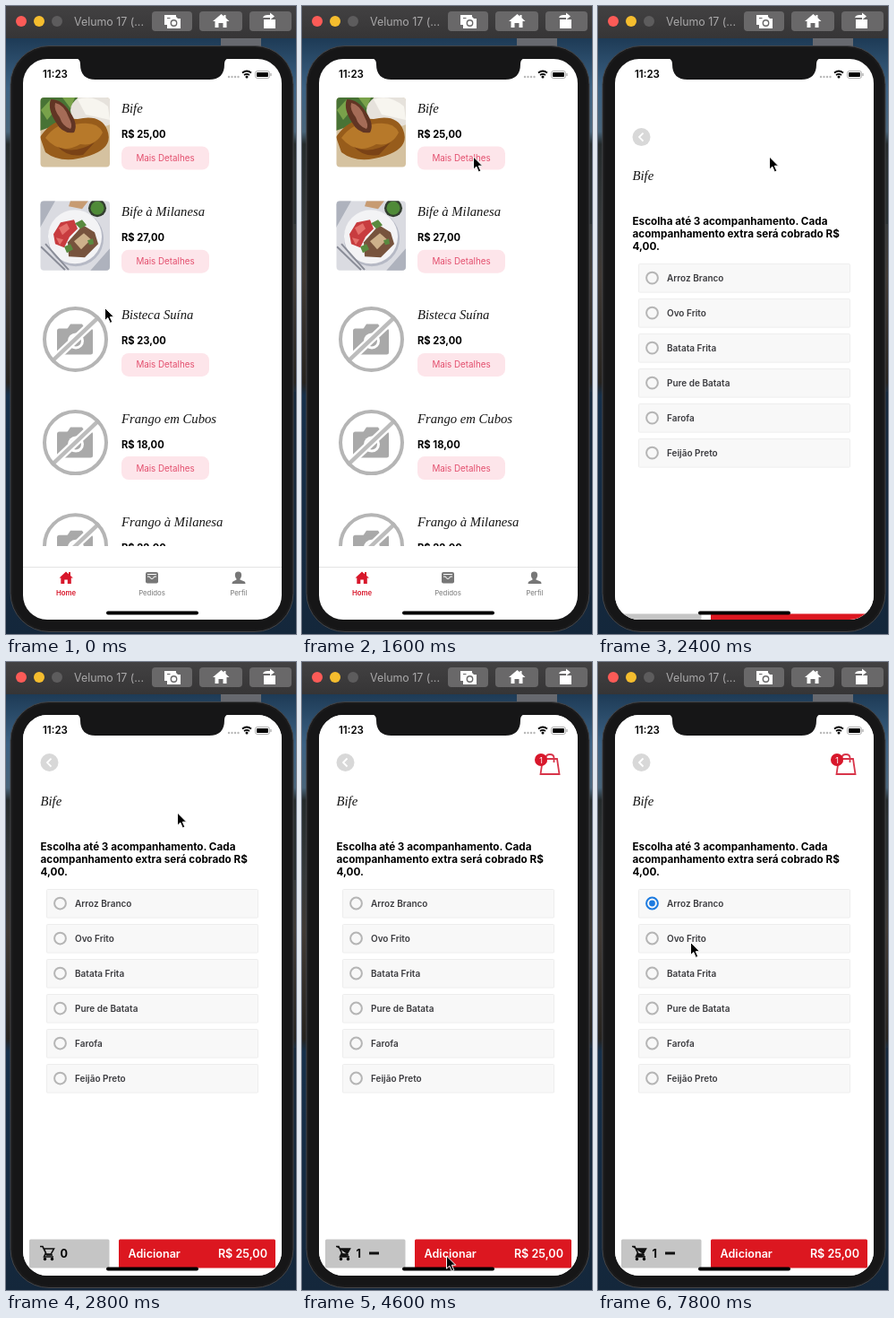
Write an HTML page that moves like this. It is 324 px wide and 700 px high and loops after 8 s.

```html
<!DOCTYPE html>
<html lang="pt-BR">
<head>
<meta charset="utf-8">
<title>Cardápio</title>
<style>
  html, body { margin: 0; width: 100%; height: 100%; overflow: hidden; background: #14273b; }
  svg { display: block; width: 100%; height: 100%; }
  text { font-family: Inter, Roboto, sans-serif; }
  .dish { font: italic 14.7px "Liberation Serif", "Noto Serif", serif; fill: #151515; }
  .price { font-size: 11.2px; font-weight: 700; }
  .more { font-size: 9.8px; fill: #e34e6d; text-anchor: middle; }
  .ask { font-size: 11.7px; font-weight: 700; }
  .option { font-size: 10px; font-weight: 600; fill: #3b3b3f; }
  .bar { font-size: 12.6px; font-weight: 600; }
  .tab { font-size: 7.8px; text-anchor: middle; fill: #777; }
</style>
</head>
<body>
<svg viewBox="0 0 324 700" preserveAspectRatio="none">
  <defs>
    <linearGradient id="sky" x2="0" y2="1">
      <stop offset=".05" stop-color="#1d3a55"/><stop offset=".13" stop-color="#3c6284"/>
      <stop offset=".2" stop-color="#49657b"/><stop offset=".22" stop-color="#252b2c"/>
      <stop offset=".34" stop-color="#35393a"/><stop offset=".43" stop-color="#403a35"/>
      <stop offset=".6" stop-color="#26231f"/><stop offset=".62" stop-color="#16304b"/>
      <stop offset="1" stop-color="#14273b"/>
    </linearGradient>
    <linearGradient id="toolbar" x2="0" y2="1">
      <stop stop-color="#424142"/><stop offset="1" stop-color="#363536"/>
    </linearGradient>
    <clipPath id="screen"><rect x="19" y="59" width="289" height="625" rx="27"/></clipPath>
    <clipPath id="list"><rect x="19" y="59" width="289" height="543"/></clipPath>
    <clipPath id="photo"><rect x="38.5" y="102" width="77.5" height="77.5" rx="4"/></clipPath>

    <g id="steak" clip-path="url(#photo)">
      <path fill="#d5c2a0" d="M38 102h78v78H38z"/>
      <path fill="#487335" d="M38 102h42l-8 25-34 12z"/>
      <path fill="#79a24a" d="M39 116l11-12 10 6-14 17zM63 102l14 0-5 12z"/>
      <ellipse cx="101" cy="116" rx="29" ry="19" fill="#e6e2dc"/>
      <path fill="#f7f5ef" d="M80 104q18-6 34 8l2 15-27-6z"/>
      <path fill="#975c1b" d="M38 146q15-23 42-20 26-6 33 12 8 20-20 29-31 10-49-4z"/>
      <path fill="#b7792a" d="M44 147q14-19 33-15 25-5 31 9-8 16-25 13-22 13-39-7z"/>
      <path fill="#7a4216" d="M58 157q18 9 41-5l-13 14q-17 3-28-9z"/>
      <path fill="#613524" d="M50 104q13 0 22 15 9 13 4 22-13 2-20-11-10-15-6-26z"/>
      <path fill="#a56c57" d="M55 108q10 2 15 16 5 9 2 13-9-3-12-13-7-9-5-16z"/>
    </g>
    <g id="salad" clip-path="url(#photo)">
      <path fill="#dadbe1" d="M38 102h78v78H38z"/>
      <path fill="#aeb2bd" d="M38 102l17 0-17 30zM94 180l22-25v25z"/>
      <path fill="#c79b72" d="M72 102h20l-7 9-15-3z"/>
      <circle cx="78" cy="144" r="31" fill="#b6b9c5"/>
      <circle cx="77" cy="142" r="30" fill="#f3f3f5"/>
      <circle cx="102" cy="110" r="10" fill="#333e30"/>
      <circle cx="102" cy="110" r="7.5" fill="#4f8a38"/>
      <path fill="#c83c3f" d="M53 139l8-13 15-3 4 10-9 9-6 12-10-4z"/>
      <path fill="#e4706b" d="M59 132l9-5 3 6-8 7zM56 143l8 2-4 6z"/>
      <path fill="#77533d" d="M69 148l17-19 13 8 4 13-15 15-18-1z"/>
      <path fill="#cdb18b" d="M76 147l11-9 8 7-11 11z"/>
      <path fill="#598a3f" d="M77 127l8-4 5 6-7 4zM65 153l7-3 3 6-7 4zM91 146l6-2 1 6-5 1z"/>
      <path stroke="#8a8d98" stroke-width="2" d="M39 153l27 26M44 150l26 29"/>
    </g>
    <g id="empty">
      <rect x="57" y="129" width="40" height="29" rx="2.5" fill="#a9a9a9"/>
      <path fill="#a9a9a9" d="M68 130l4-6h13l4 6z"/>
      <circle cx="78" cy="143" r="9" fill="#fff"/><circle cx="78" cy="143" r="6" fill="#a9a9a9"/>
      <path stroke="#fff" stroke-width="9" d="M103 117L52 165"/>
      <path stroke="#bcbcbc" stroke-width="4.5" d="M104 116L51 166"/>
      <circle cx="77.5" cy="141" r="34.5" fill="none" stroke="#b5b5b5" stroke-width="4"/>
    </g>
  </defs>

  <path fill="url(#sky)" d="M0 0h324v700H0z"/>
  <path fill="#67696f" d="M240 36h45v10h-45z"/>
  <path fill="#282f31" d="M320 171h4v72h-4z"/>
  <path fill="#14273b" d="M320 430h4v270h-4z"/>

  <path fill="url(#toolbar)" d="M0 0h324v36H0z"/>
  <circle cx="17" cy="17" r="6" fill="#fc5b57"/>
  <circle cx="37" cy="17" r="6" fill="#f5bd2e"/>
  <circle cx="57" cy="17" r="6" fill="#5d5c5d"/>
  <text x="76" y="22" font-size="12.4" fill="#aaa9aa">Velumo 17 (...</text>
  <g fill="#696869">
    <rect x="163" y="6" width="45" height="22" rx="4"/>
    <rect x="216" y="6" width="48" height="22" rx="4"/>
    <rect x="272" y="6" width="47" height="22" rx="4"/>
  </g>
  <g fill="#fff">
    <path d="M177 10h13v3h-10v8h-3z"/>
    <path d="M180 14h3l2-2h5l2 2h3v11h-15z"/>
    <circle cx="187.500" cy="19" r="3.2" fill="none" stroke="#696869" stroke-width="1.4"/>
    <path d="M231 17l9.500-8 3 2.500V10h2v3.200l4 3.800h-3v7h-4v-5h-5v5h-4v-7z"/>
    <path d="M288 15h13v10h-13z"/>
    <path d="M287 13q1-3 5-3h3V7.500l5 4-5 4V13z"/>
  </g>

  <rect x="5" y="44.500" width="316" height="653" rx="43" fill="#1a1a1b" stroke="#444548"/>
  <rect x="8" y="47" width="310" height="648" rx="40" fill="#161617"/>
  <g clip-path="url(#screen)">
    <path fill="#fff" d="M19 59h289v625H19z"/>
    <g id="menu" clip-path="url(#list)"></g>
    <path stroke="#e4e4e4" d="M19 625.500h289"/>
    <g fill="#d8172b">
      <path d="M59.500 637.500l7.500-7 3 2.700V631h2v4l3 2.500h-2.200v6.500h-4v-4.500h-3.500v4.500h-4v-6.500z"/>
      <text class="tab" x="67" y="656.500" style="fill:#d8172b;font-weight:600">Home</text>
    </g>
    <rect x="156" y="631" width="14" height="12.500" rx="2" fill="#777"/>
    <path stroke="#fff" fill="none" d="M158 633.500h10M158 636h2.500q.5 2.500 2.500 2.500t2.500-2.500h2.500"/>
    <text class="tab" x="163" y="656.500">Pedidos</text>
    <path fill="#777" d="M259.500 630.500c5 0 4 6 2 8v1l5 2q1 .5 1 2.500h-15q0-2 1-2.500l4-2v-1c-2-2-3-8 2-8z"/>
    <text class="tab" x="260" y="656.500">Perfil</text>

    <g id="detail">
      <path fill="#fff" d="M19 59h289v625H19z"/>
      <circle cx="48.500" cy="112" r="10" fill="#d8d8d8"/>
      <path d="M50.500 107.500l-4.500 4.500 4.500 4.500" fill="none" stroke="#fff" stroke-width="1.800"/>
      <text class="dish" x="38.500" y="160">Bife</text>
      <text class="ask" x="38.500" y="210">Escolha até 3 acompanhamento. Cada</text>
      <text class="ask" x="38.500" y="224">acompanhamento extra será cobrado R$</text>
      <text class="ask" x="38.500" y="238">4,00.</text>
      <g id="options"></g>
      <g id="bag" fill="none" stroke="#d8354a" stroke-width="1.800">
        <path d="M269 108h16l2.500 17h-21zM272.500 112v-5q0-4 4.500-4t4.500 4v5"/>
        <circle cx="267" cy="109" r="7" fill="#d8172b" stroke="none"/>
        <text x="267" y="112.500" font-size="9" fill="#fff" stroke="none" text-anchor="middle">1</text>
      </g>
      <rect x="26" y="643.500" width="89.500" height="32" rx="1.500" fill="#c5c5c5"/>
      <path d="M38 651.500h3l4.500 9.500h6.500M42.500 654h11l-3.300 6h-5.200zM44.500 658.500l-2 4.500h10.500" id="cart" fill="none" stroke="#111" stroke-width="1.600"/>
      <circle cx="43.500" cy="665.500" r="1.700"/><circle cx="51.500" cy="665.500" r="1.700"/>
      <text class="bar" id="count" x="60.500" y="664" style="font-weight:700">0</text>
      <path id="minus" d="M75 657.500h11v3H75z" fill="#111"/>
      <g id="add">
        <rect x="126" y="643.500" width="175" height="32" rx="1.500" fill="#dc1720"/>
        <text class="bar" x="136.500" y="664" fill="#fff">Adicionar</text>
        <text class="bar" x="292" y="664" fill="#fff" text-anchor="end">R$ 25,00</text>
      </g>
    </g>

    <text x="41" y="80" font-size="11.500" font-weight="600">11:23</text>
    <g fill="#b8b8b8">
      <circle cx="249" cy="79" r="1.200"/><circle cx="252.500" cy="79" r="1.200"/>
      <circle cx="256" cy="79" r="1.200"/><circle cx="259.500" cy="79" r="1.200"/>
    </g>
    <path d="M264 74.500q5-4 10 0M266 77q3-2.400 6 0" fill="none" stroke="#000" stroke-width="1.700"/>
    <circle cx="269" cy="79" r="1.500"/>
    <rect x="278.500" y="72.500" width="16" height="8" rx="2.300" fill="none" stroke="#999" stroke-width=".8"/>
    <rect x="280" y="74" width="13" height="5" rx="1"/>
    <path stroke="#999" d="M296 75v3"/>
    <rect x="112" y="674.500" width="103" height="4" rx="2"/>
    <path fill="#161617" d="M76 58q7 0 7 7 0 17 17 17h127q17 0 17-17 0-7 7-7z"/>
  </g>
  <path id="cursor" d="M0 0v14.200l3.300-3.100 2.500 5.800 2.500-1.100-2.500-5.600h4.400z" stroke="#fff" stroke-width="1" stroke-linejoin="round"/>
</svg>
<script>
const LOOP = 8000, STEP = 200;
const $ = id => document.getElementById(id);

const dishes = [
  ['Bife', '25,00', 'steak'], ['Bife à Milanesa', '27,00', 'salad'],
  ['Bisteca Suína', '23,00', 'empty'], ['Frango em Cubos', '18,00', 'empty'],
  ['Frango à Milanesa', '22,00', 'empty']
];
// The salad art shares the first row's coordinates, like every picture.
$('menu').innerHTML = dishes.map(([name, price, art], i) => `
  <g transform="translate(0 ${i * 115.2})">
    <use href="#${art}"/>
    <text class="dish" x="129" y="119">${name}</text>
    <text class="price" x="129" y="147">R$ ${price}</text>
    <g class="button">
      <rect x="129" y="156.500" width="98" height="26" rx="8" fill="#fde5ea"/>
      <text class="more" x="178" y="173">Mais Detalhes</text>
    </g>
  </g>`).join('');

$('options').innerHTML = ['Arroz Branco', 'Ovo Frito', 'Batata Frita', 'Pure de Batata', 'Farofa', 'Feijão Preto']
  .map((name, i) => `
  <g transform="translate(0 ${i * 39})">
    <rect x="45.500" y="253.500" width="236" height="31.500" rx="1" fill="#f8f8f8" stroke="#ededed"/>
    <circle class="ring" cx="60.500" cy="269" r="6.400" fill="none" stroke="#b5b5b5" stroke-width="2"/>
    <circle class="dot" cx="60.500" cy="269" r="3.400" fill="#1d7be0" visibility="hidden"/>
    <text class="option" x="77" y="272.500">${name}</text>
  </g>`).join('');

const button = document.querySelector('.button');
const ring = document.querySelector('.ring');
const dot = document.querySelector('.dot');

// time, x, y
const path = [
  [0, 110.5, 336.500], [200, 110.5, 336.500], [800, 198.500, 173], [1400, 191.500, 168],
  [2800, 191.500, 168], [3600, 161.500, 662], [4800, 161.500, 662], [5400, 286, 105],
  [6000, 117.500, 267.500], [6600, 117.500, 267.500], [7200, 106, 299], [7600, 103.500, 312.500], [8000, 103.500, 312.500]
];

function cursorAt(t) {
  const i = path.findIndex(p => p[0] > t);
  const [t0, x0, y0] = path[i - 1], [t1, x1, y1] = path[i];
  const u = (t - t0) / (t1 - t0), k = u * u * (3 - 2 * u);
  return [x0 + (x1 - x0) * k, y0 + (y1 - y0) * k];
}

// Critically damped spring sliding the page up.
function slideAt(t) {
  const u = Math.max(0, t - 2146) * 0.01826;
  return 625 * (1 + u) * Math.exp(-u);
}

const show = (node, on) => node.setAttribute('visibility', on ? 'visible' : 'hidden');

function draw(now) {
  const t = Math.floor(now % LOOP / STEP) * STEP;
  const ordered = t >= 4200, picked = t >= 6800;

  $('cursor').setAttribute('transform', `translate(${cursorAt(t)})`);
  $('detail').setAttribute('transform', `translate(0 ${slideAt(t)})`);
  button.setAttribute('opacity', t < 2000 ? 1 : 0.36);
  $('add').setAttribute('opacity', t === 4000 ? 0.3 : t === 4200 ? 0.6 : 1);

  show($('bag'), ordered);
  show($('minus'), ordered);
  $('count').textContent = ordered ? 1 : 0;
  $('cart').setAttribute('fill', ordered ? '#111' : 'none');

  ring.setAttribute('stroke', picked ? '#1d7be0' : '#b5b5b5');
  show(dot, picked);
  requestAnimationFrame(draw);
}
requestAnimationFrame(draw);
</script>
</body>
</html>
```
